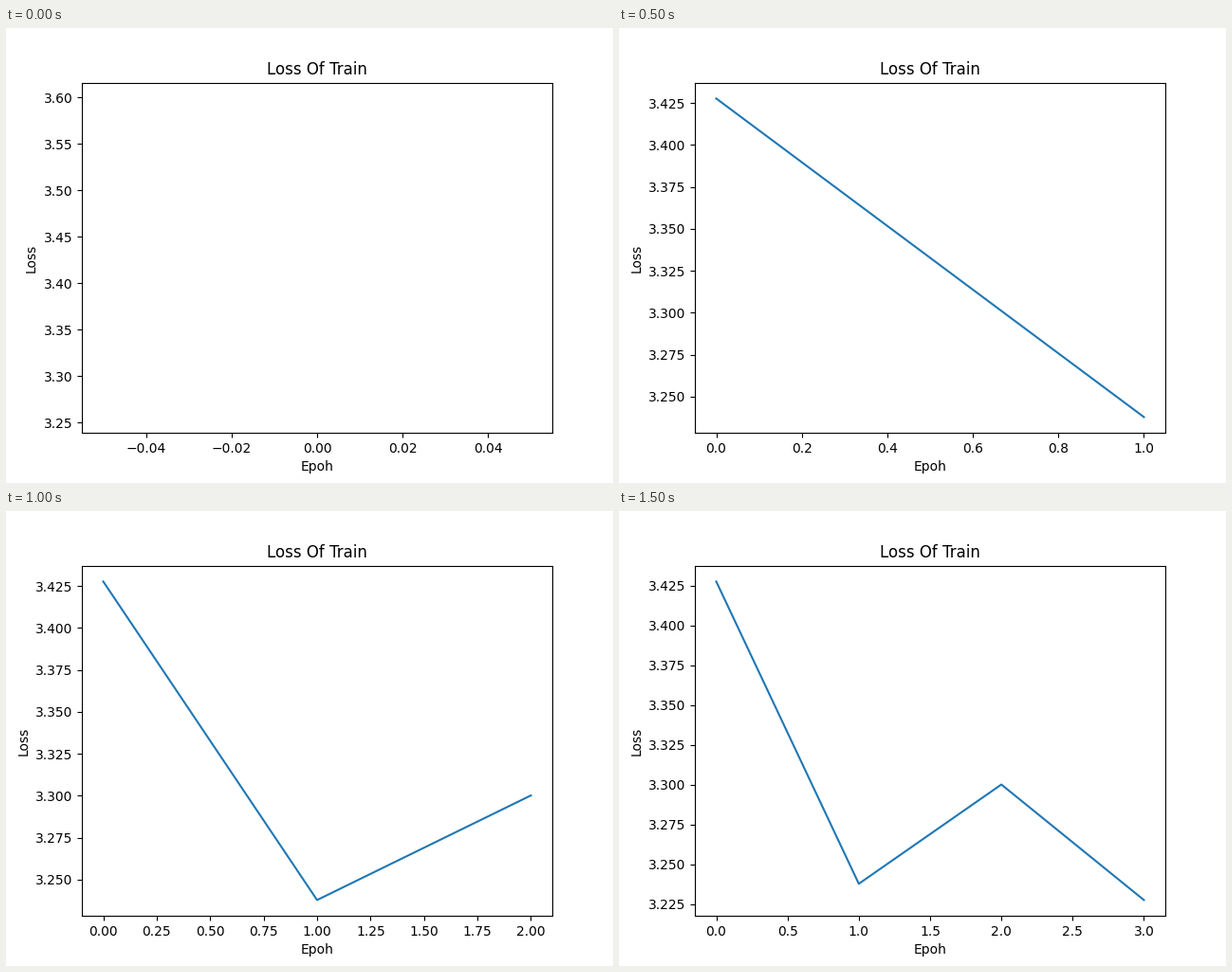
Write a matplotlib script that moves like this. It is 640 px wide and 480 px high and loops after 2 s.

```python
import matplotlib.pyplot as plt
from matplotlib.animation import FuncAnimation

LOSSES = [3.4276, 3.2379, 3.3002, 3.2277]

fig, ax = plt.subplots(figsize=(6.4, 4.8), dpi=100)


def draw(epoch):
    """Replot the losses up to this epoch with fresh axis limits."""
    ax.clear()
    ax.set_title("Loss Of Train")
    ax.set_xlabel("Epoh")
    ax.set_ylabel("Loss")
    ax.plot(range(epoch + 1), LOSSES[:epoch + 1], color="tab:blue")
    return ax.lines


anim = FuncAnimation(fig, draw, frames=len(LOSSES), init_func=lambda: draw(0),
                     interval=500, repeat=True, repeat_delay=0)
plt.show()
```
